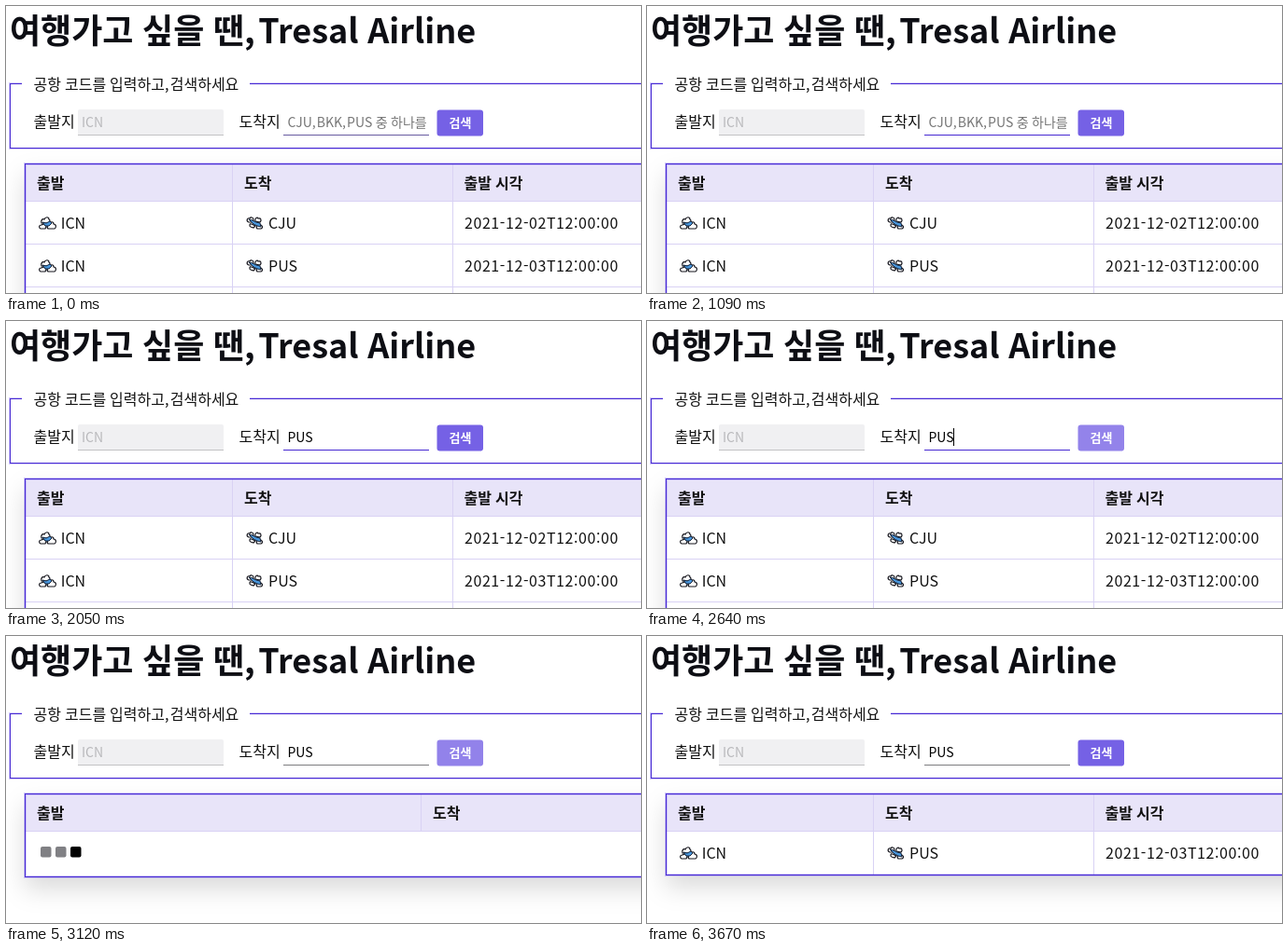
These frames come from a looping animation (680x308 px, 5560 ms). An HTML page:

```html
<!DOCTYPE html>
<html lang="ko">
<head>
<meta charset="utf-8">
<title>항공편 검색</title>
<style>
  html, body { margin: 0; width: 100%; height: 100%; overflow: hidden; background: #fff; }
  svg { display: block; font: 16px "Noto Sans CJK KR", "Noto Sans CJK", sans-serif; word-spacing: -.03em; fill: #111; }
  .bold { font-weight: 700; }
  .title { font-size: 36px; font-weight: 700; fill: #0d0e14; }
  .field { font-size: 14px; font-weight: 500; }
  .time { letter-spacing: .036em; }
  .frame { fill: #fff; stroke: #4629d2; }
  .glow { fill: none; stroke: #6a4ff0; stroke-opacity: .3; stroke-width: 3; }
  .grid { fill: none; stroke: #d9d2f4; }
  .cloud { fill: #fff; stroke: #15151c; stroke-width: 1.2; }
  .wing { fill: #4a97dc; stroke: #14243c; stroke-width: 1; }
</style>
</head>
<body>
<svg width="680" height="308" viewBox="0 0 680 308">
  <defs>
    <filter id="lift" filterUnits="userSpaceOnUse" x="-40" y="100" width="800" height="460">
      <feDropShadow dx="0" dy="13" stdDeviation="13" flood-color="#000" flood-opacity=".14"/>
    </filter>
    <clipPath id="inputClip"><rect x="298" y="108" width="154" height="32"/></clipPath>
    <g id="takeoff">
      <path class="cloud" d="M3 8C2 5 4 3 6 4C7 1 11 1 11 4C13 5 12 8 10 8Z"/>
      <path class="cloud" d="M2 14C0 13 0 10 3 10C5 8 8 10 8 12L7 14Z"/>
      <path class="cloud" d="M10 14C8 12 10 9 12 9C12 6 16 6 16 9C19 9 19 13 17 14Z"/>
      <path class="wing" d="M4 7L8 8L12 6L14 8L11 11L7 11Z"/>
    </g>
    <g id="landing">
      <path class="cloud" d="M3 7C0 6 1 2 4 3C5 1 8 2 8 4L7 7Z"/>
      <path class="cloud" d="M10 6C9 3 12 1 13 3C16 2 17 5 15 7Z"/>
      <path class="cloud" d="M5 12C3 11 4 8 6 9L10 11L8 13Z"/>
      <path class="cloud" d="M12 14C10 12 12 10 14 10C17 9 19 13 16 14Z"/>
      <path class="wing" d="M3 4L7 5L11 7L15 8L16 12L12 11L8 9Z"/>
    </g>
  </defs>

  <text class="title" x="4" y="40">여행가고 싶을 땐,<tspan dx="-.17em"> Tresal Airline</tspan></text>

  <rect class="glow" x="4.5" y="83.5" width="720" height="69"/>
  <rect class="frame" x="4.5" y="83.5" width="720" height="69"/>
  <rect x="17" y="74" width="244" height="22" fill="#fff"/>
  <text x="29.5" y="90">공항 코드를 입력하고,<tspan dx="-.17em"> 검색하세요</tspan></text>
  <text x="29.5" y="130">출발지</text>
  <path d="M77 113a2 2 0 0 1 2-2H231a2 2 0 0 1 2 2V139H77Z" fill="#f0f0f2"/>
  <path d="M77 138.5H233" stroke="#c2c2c4"/>
  <text class="field" x="81" y="130" fill="#b8b8bb">ICN</text>
  <text x="249.5" y="130">도착지</text>
  <g clip-path="url(#inputClip)">
    <text class="field" id="hint" x="301.5" y="130" fill="#757575">CJU,<tspan dx="-.17em"> BKK,</tspan><tspan dx="-.17em"> PUS 중 하나를</tspan></text>
    <text class="field" id="typed" x="301.5" y="130" fill="#000"></text>
  </g>
  <path id="underline" d="M297 138.5H453"/>
  <rect id="caret" y="115" width="1" height="19" fill="#000"/>
  <g id="button">
    <rect x="461.5" y="111.5" width="49.5" height="28" rx="3" fill="#7561e5"/>
    <text class="bold" x="486.5" y="130" font-size="13" text-anchor="middle" fill="#fff">검색</text>
  </g>
  <g id="tables"></g>
</svg>
<script>
const LOOP = 5560, LOADING = 2670, LOADED = 3600, DOT_STEP = 130;
const TYPING = [1160, 1340, 1440];
const BLINKS = [530, 700, 890, 1090, 1160, 1640, 1820, 2050, 2210, 2420, 2620, 2670];
const PURPLE = [70, 41, 210], GREY = [125, 125, 128];
const $ = id => document.getElementById(id);

const header = (x, label) => `<text class="bold" x="${x}" y="196">${label}</text>`;

const flight = (y, to, day) => `
  <use href="#takeoff" x="35" y="${y - 14}"/><text x="58.7" y="${y}">ICN</text>
  <use href="#landing" x="257" y="${y - 14}"/><text x="281" y="${y}">${to}</text>
  <text class="time" x="491" y="${y}">2021-12-${day}T12:00:00</text>`;

const table = (id, bottom, columns, columnEnd, rows, body) => {
  const box = `x="20.5" y="169.5" width="720" height="${bottom - 169.5}"`;
  return `
  <g id="${id}">
    <rect class="frame" filter="url(#lift)" ${box}/>
    <rect x="21" y="170" width="659" height="39" fill="#e8e4f9"/>
    <path class="grid" d="M21 209.5H680${rows.map(y => `M21 ${y}H680`).join('')}
      ${columns.map(x => `M${x} 170V${columnEnd}`).join('')}"/>
    <rect class="glow" ${box}/>
    <rect class="frame" style="fill: none" ${box}/>
    ${body}
  </g>`;
};

const headers = header(33, '출발') + header(255, '도착') + header(490.5, '출발 시각');
const dots = [0, 1, 2].map(i =>
  `<rect class="dot" x="${37 + 16 * i}" y="226" width="11.5" height="11.5" rx="2"/>`).join('');

$('tables').innerHTML =
  table('all', 420.5, [242.5, 478.5], 420, [255.5, 301.5],
    headers + flight(239, 'CJU', '02') + flight(285, 'PUS', '03')) +
  table('loading', 258.5, [444.5], 209, [], header(33, '출발') + header(457, '도착') + dots) +
  table('found', 256.5, [242.5, 478.5], 256, [], headers + flight(239, 'PUS', '03'));

const dotNodes = document.querySelectorAll('.dot');
const ramp = (t, from, to) => Math.min(1, Math.max(0, (t - from) / (to - from)));
const passed = (times, t) => times.filter(time => t >= time).length;
const show = (id, on) => $(id).setAttribute('display', on ? 'inline' : 'none');

function draw(t) {
  const text = 'PUS'.slice(0, passed(TYPING, t));
  if ($('typed').textContent !== text) $('typed').textContent = text;
  show('hint', !text);

  show('caret', passed(BLINKS, t) % 2);
  $('caret').setAttribute('x', Math.floor(301 + (text ? $('typed').getComputedTextLength() : 0)));

  const focus = t < 80 ? .4 : 1 - ramp(t, LOADING, 2880);
  const mix = GREY.map((g, i) => Math.round(g + (PURPLE[i] - g) * focus));
  $('underline').setAttribute('stroke', `rgb(${mix})`);

  const fade = ramp(t, 2440, 2740) - ramp(t, 3020, 3300);
  $('button').setAttribute('opacity', 1 - .33 * fade);

  show('all', t < LOADING);
  show('loading', t >= LOADING && t < LOADED);
  show('found', t >= LOADED);
  const active = (2 + Math.floor(Math.max(0, t - LOADING) / DOT_STEP)) % 3;
  dotNodes.forEach((dot, i) => dot.setAttribute('fill', i === active ? '#000' : '#808084'));
}

const start = performance.now();
function tick() {
  draw((performance.now() - start) % LOOP);
  requestAnimationFrame(tick);
}
tick();
</script>
</body>
</html>
```
